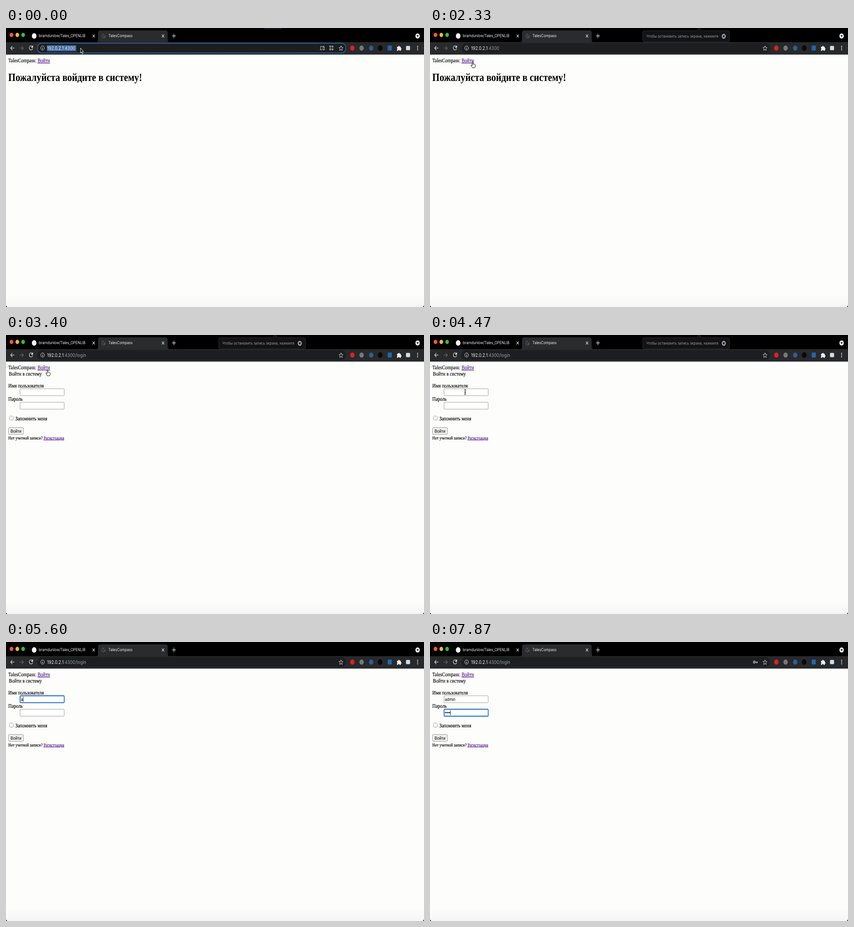
Write an HTML page that moves like this. It is 917x611 px and loops after 8 s.

```html
<!DOCTYPE html>
<html lang="ru">
<head>
<meta charset="utf-8">
<style>
  html, body { margin: 0; width: 100%; height: 100%; overflow: hidden; background: #000; }
  svg { display: block; width: 100vw; height: 100vh; }
  text { white-space: pre; text-rendering: geometricPrecision; }
  .ui { font: 12px Inter, "Open Sans", sans-serif; fill: #eceef0; }
  .url { font-size: 14.2px; }
  .item { font-size: 13px; }
  .hint { font-size: 11.7px; fill: #98989d; }
  .page { font: 16px "Liberation Serif", "Times New Roman", serif; fill: #000; stroke: #000; stroke-width: .25; }
  .small { font-size: 13.33px; }
  .head { font-size: 32px; font-weight: bold; stroke: none; }
  .field { font: 13.33px "Liberation Sans", Arial, sans-serif; fill: #000; }
  .link { fill: #551a8b; stroke: #551a8b; text-decoration: underline; }
  .line { fill: none; stroke: #dfe1e5; stroke-width: 1.7; }
  .thin { stroke-width: 1.3; }
  .box { fill: #fff; stroke: #767676; }
  .box.focus { stroke: #1565c0; stroke-width: 2.6; }
</style>
</head>
<body>
<!-- A 1440 x 807 window squeezed onto the stage -->
<svg viewBox="0 0 1440 807" preserveAspectRatio="none">
  <!-- Tab strip -->
  <rect width="1440" height="42"/>
  <circle cx="19" cy="20" r="6.2" fill="#f2564d"/>
  <circle cx="39" cy="20" r="6.2" fill="#eeb92f"/>
  <circle cx="59" cy="20" r="6.2" fill="#35b944"/>
  <path d="M309 42q8 0 8-8V14q0-7 8-7H549q8 0 8 7V34q0 8 8 8z" fill="#2a2b2d"/>
  <circle cx="97" cy="23" r="8" fill="#f4f4f4"/>
  <text class="ui" x="113" y="27">bramdunlow/Tales_OPENLIB</text>
  <text class="ui" x="353" y="27">TalesCompass</text>
  <g id="globe">
    <circle cx="336" cy="23" r="7.5" fill="#46484d"/>
    <path d="M330 20l5 3-1 5M337 16l2 4 4 1" fill="none" stroke="#202125" stroke-width="2"/>
  </g>
  <circle id="spin" cx="336" cy="23" r="7" class="line" stroke-dasharray="3 60"/>
  <path class="line" d="M298 19l8 8m0-8l-8 8M537 19l8 8m0-8l-8 8M572 23h13M578.5 16.5v13"/>
  <circle cx="1418" cy="23" r="7.5" fill="#f1f1f1"/>
  <path d="M1414 21h8l-4 5z"/>

  <!-- Toolbar -->
  <rect y="41" width="1440" height="36" fill="#27292b"/>
  <path class="line" d="M29 58H16m6-6l-6 6 6 6"/>
  <path class="line" d="M47 58h13m-6-6l6 6-6 6" stroke-opacity=".35"/>
  <g id="reload">
    <path class="line" d="M91 54a6 6 0 1 0 1 5"/>
    <path d="M93 50v7h-7z" fill="#dfe1e5"/>
  </g>
  <path id="stop" class="line" d="M80 52l12 12m0-12l-12 12"/>
  <rect id="bar" x="108" y="44" width="1063" height="28" rx="14" fill="#1c1e21" stroke-width="2.2"/>
  <circle class="line thin" cx="126" cy="58" r="6.3"/>
  <path class="line" d="M126 57v5M126 54v1.6"/>
  <rect id="select" x="141" y="50" width="101" height="17" fill="#3f6ea5"/>
  <text class="ui url" x="141.5" y="63">192.0.2.1<tspan id="rest"></tspan></text>
  <g id="devices" class="line thin">
    <path d="M1084 62V53h12M1081 63h8"/>
    <rect x="1092" y="55" width="5" height="8"/>
  </g>
  <g id="grid" class="line" stroke-dasharray="3 1.5">
    <rect x="1115" y="52" width="4" height="4"/><rect x="1123" y="52" width="4" height="4"/>
    <rect x="1115" y="60" width="4" height="4"/><rect x="1123" y="60" width="4" height="4"/>
  </g>
  <g id="key" class="line">
    <circle cx="1117" cy="58" r="3"/>
    <path d="M1120 58h9M1126 58v4"/>
  </g>
  <path class="line thin" d="M1154 51.5l2 4.7 5 .5-3.8 3.3 1.1 5-4.3-2.7-4.3 2.7 1.1-5-3.8-3.3 5-.5z"/>
  <circle cx="1193" cy="58" r="7.5" fill="#e0201c"/>
  <circle cx="1225" cy="58" r="7.5" fill="#77787b"/>
  <circle cx="1258" cy="58" r="7.5" fill="#2c5f97"/>
  <circle cx="1289" cy="58" r="8" fill="#08090b"/>
  <rect x="1315" y="51" width="14" height="14" fill="#1c6aae"/>
  <path d="M1347 54h4a2.500 2.500 0 1 1 5 0h4v4a2.500 2.500 0 1 1 0 5v3h-4a2.500 2.500 0 0 0-5 0h-4v-4a2.500 2.500 0 0 0 0-4z" fill="#eceef0"/>
  <rect x="1378" y="52" width="14" height="12" rx="2" fill="#cfe0ea"/>
  <g fill="#eceef0">
    <circle cx="1418" cy="53" r="1.6"/><circle cx="1418" cy="58" r="1.6"/><circle cx="1418" cy="63" r="1.6"/>
  </g>

  <!-- Recording hint -->
  <rect id="scrap" x="890" width="60" height="4" fill="#11111f"/>
  <g id="hint">
    <path d="M738 8H916q4 0 7-4 5-6 10 0 3 4 7 4H1027q5 0 5 5V35q0 5-5 5H738q-5 0-5-5V13q0-5 5-5z" fill="#131316" stroke="#3b3b42"/>
    <text class="ui hint" x="745" y="28">Чтобы остановить запись экрана, нажмите</text>
    <circle cx="1012" cy="24" r="7" fill="#a5a5a9"/>
    <rect x="1009" y="21" width="6" height="6" fill="#1c1c20"/>
  </g>

  <!-- Page -->
  <linearGradient id="fade" x2="0" y2="1">
    <stop offset=".95" stop-color="#fdfdfc"/><stop offset="1" stop-color="#f5f5f5"/>
  </linearGradient>
  <path d="M0 77H1440V800q0 7-7 7H7q-7 0-7-7z" fill="url(#fade)"/>
  <text class="page" x="8" y="99.5">TalesCompass: <tspan class="link">Войти</tspan></text>
  <text id="home" class="page head" x="8" y="153">Пожалуйста войдите в систему!</text>
  <g id="login">
    <text class="page" x="10" y="117.5">Войти в систему</text>
    <text class="page" x="8" y="151.5">Имя пользователя</text>
    <text class="page" x="8" y="190.5">Пароль</text>
    <rect id="box0" x="48.5" y="155.5" width="152" height="20" rx="2"/>
    <rect id="box1" x="48.5" y="194.5" width="152" height="20" rx="2"/>
    <text id="val0" class="field" x="51" y="170"></text>
    <text id="val1" class="field" x="51" y="209"></text>
    <rect id="caret" width="1.4" height="15"/>
    <rect class="box" x="12.5" y="234.5" width="12" height="12" rx="2.5"/>
    <text class="page" x="32" y="246.5">Запомнить меня</text>
    <rect class="box" x="8.5" y="267.5" width="52" height="20" rx="3" style="fill:#efefef"/>
    <text class="field" x="34.5" y="282" text-anchor="middle">Войти</text>
    <text class="page small" x="8" y="302">Нет учетной записи? <tspan class="link">Регистрация</tspan></text>
  </g>
  <g id="menu">
    <rect x="47" y="178" width="194" height="232" rx="5" opacity=".2"/>
    <rect x="48" y="176" width="192" height="232" rx="4" fill="#212428"/>
  </g>

  <!-- Pointers, each with its hot spot at 0,0 -->
  <g id="pointer">
    <path id="arrow" d="M0 0V14l3.300-3 2.500 6 2.700-1.200-2.500-5.800H10z" stroke="#fff" stroke-width="1.3"/>
    <path id="hand" d="M-1.500 1.500q0-2 1.500-2t1.500 2V7q1-1 2.500 0 1-.8 2.500.3 2-.5 2.500 1.700v4q0 2-1.500 4H-1l-4.500-6q-1-2 1-2.300l3 2z" fill="#fff" stroke="#000" stroke-width="1.3"/>
    <path id="beam" d="M-3-8q3 0 3 2V6q0 2-3 2M3-8q-3 0-3 2V6q0 2 3 2M-2 2h4" fill="none" stroke="#000" stroke-width="1.1"/>
  </g>
</svg>
<script>
const $ = id => document.getElementById(id);
const show = (id, on) => { $(id).style.display = on ? "" : "none"; };
const clamp = v => Math.max(0, Math.min(1, v));

["vmvm", "4141", "bramdun_low", "moose4936@nomo.test", "1711", "kentril"].forEach((name, i) => {
  const el = document.createElementNS("http://www.w3.org/2000/svg", "text");
  el.setAttribute("class", "ui item");
  el.setAttribute("x", 60);
  el.setAttribute("y", 208 + i * 35.8);
  el.textContent = name;
  $("menu").append(el);
});

const ENTER = 1130, LOADED = 1470, OPEN = 2800, CLICK = 4600, TAB = 7140;
const nameKeys = [5530, 5660, 5790, 5920, 6030];
const passKeys = [7600, 7690, 7780, 7870];
const path = [[0, 257, 58], [1870, 257, 58], [2270, 147, 98], [2670, 146, 98],
  [3300, 143, 101], [3600, 143, 101], [4400, 121, 165], [8000, 121, 165]];

function pointerAt(t) {
  const i = path.findIndex(p => p[0] > t);
  const [t0, x0, y0] = path[i - 1], [t1, x1, y1] = path[i];
  const k = (t - t0) / (t1 - t0), e = k * k * (3 - 2 * k);
  return [x0 + (x1 - x0) * e, y0 + (y1 - y0) * e];
}

function drawPointer(t) {
  const [x, y] = pointerAt(t);
  const hand = x > 108 && x < 152 && y > 84 && y < 104;
  const beam = t > OPEN && x > 48 && x < 201 && y > 155 && y < 176;
  $("pointer").setAttribute("transform", `translate(${x} ${y})`);
  show("pointer", t < nameKeys[0]);
  show("hand", hand);
  show("beam", beam);
  show("arrow", !hand && !beam);
}

function drawForm(t) {
  const active = t < CLICK ? -1 : t < TAB ? 0 : 1;
  const typed = keys => keys.filter(k => k <= t).length;
  $("val0").textContent = "admin".slice(0, typed(nameKeys));
  $("val1").textContent = "•".repeat(typed(passKeys));
  [0, 1].forEach(i => $("box" + i).setAttribute("class", i === active ? "box focus" : "box"));
  const last = Math.max(...[CLICK, ...nameKeys, TAB, ...passKeys].filter(k => k <= t));
  show("caret", active >= 0 && (t - last) % 1040 < 500);
  if (active >= 0) {
    $("caret").setAttribute("x", 51 + $("val" + active).getComputedTextLength());
    $("caret").setAttribute("y", 158 + active * 39);
  }
  show("menu", t >= CLICK && t < nameKeys[0]);
}

function draw() {
  const t = performance.now() % 8000;
  const editing = t < ENTER, login = t >= OPEN;
  const loading = t >= ENTER && t < LOADED || t >= 2730 && t < 2930;

  show("select", editing);
  show("devices", editing);
  show("grid", t < LOADED);
  show("key", t >= passKeys[0]);
  show("reload", !loading);
  show("stop", loading);
  show("globe", !loading);
  show("spin", loading);
  $("spin").setAttribute("transform", `rotate(${-100 - (t - 1270) * 0.3} 336 23)`);
  $("bar").setAttribute("stroke", editing ? "#2f639f" : "none");
  $("rest").textContent = ":4300" + (login ? "/login" : "");
  $("rest").style.fill = editing ? "" : "#989ca2";

  show("scrap", t < 70);
  $("hint").style.opacity = t < 70 ? 0 : t < 130 ? 0.5 : clamp((5110 - t) / 210);

  show("home", !login);
  show("login", login);
  drawForm(t);
  drawPointer(t);
  requestAnimationFrame(draw);
}
draw();
</script>
</body>
</html>
```
